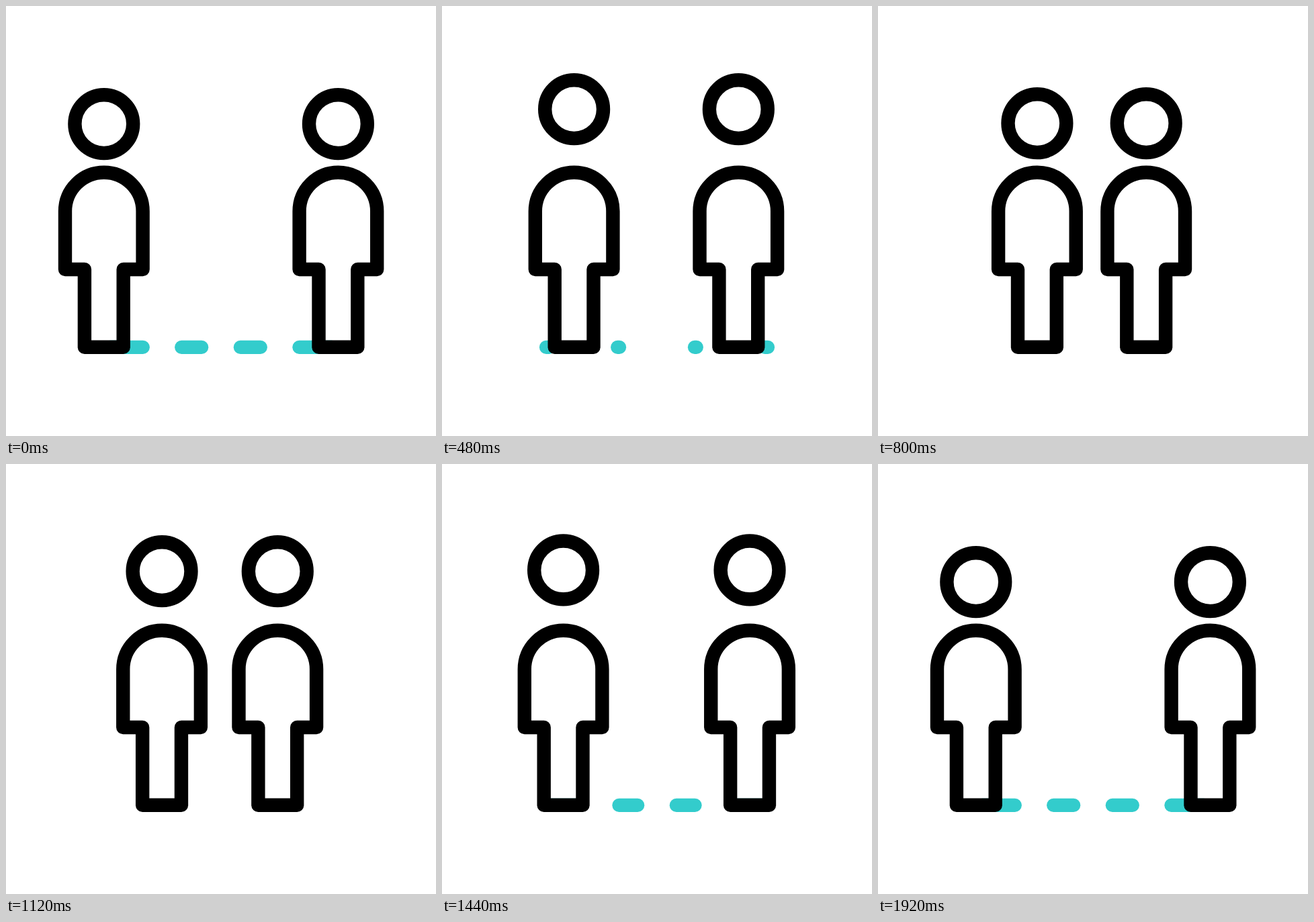
An HTML page that plays this animation: 640 by 640 pixels, repeating every 2080 ms.

```html
<!DOCTYPE html>
<html lang="en">
<head>
<meta charset="utf-8">
<title>Keeping distance</title>
<style>
  html, body { margin: 0; width: 100%; height: 100%; overflow: hidden; background: #fff; }
  svg { display: block; width: 100%; height: 100%; }
  #dashes { stroke: #33cccc; stroke-width: 20.2; }
  .person { stroke: #000; stroke-width: 20.4; }
</style>
</head>
<body>
<svg viewBox="0 0 640 640" fill="none" stroke-linecap="round" stroke-linejoin="round">
  <defs>
    <circle id="head" r="43.4"/>
    <path id="body" d="M-57.8 392V305.5A57.8 57.8 0 0 1 57.8 305.5V392H28.9V507.8H-28.9V392Z"/>
  </defs>
  <g id="dashes"><path/><path/><path/><path/></g>
  <g class="person"><use href="#head"/><use href="#body"/></g>
  <g class="person"><use href="#head"/><use href="#body"/></g>
</svg>
<script>
const LOOP = 2080, STEP = 40, LAST = 1920;
const HOP = 22, HEAD_Y = 175.6, FLOOR_Y = 507.8;

const people = [...document.querySelectorAll('.person')];
const dashes = [...document.querySelectorAll('#dashes path')];
const homes = [145.8, 494.4];
const travel = [93.5, -97.7];

// Each dash runs from its outer end to its inner end.
const spans = [[155, 203.8], [261.2, 291.2], [378.8, 348.8], [485, 436.4]];

// Symmetric ease: cubic-bezier(.5, 0, .5, 1)
function ease(x) {
  if (x <= 0) return 0;
  if (x >= 1) return 1;
  let lo = 0, hi = 1;
  for (let i = 0; i < 24; i++) {
    const p = (lo + hi) / 2;
    if (1.5 * p - 1.5 * p * p + p * p * p < x) lo = p; else hi = p;
  }
  return lo * lo * (3 - 2 * lo);
}

const ramp = (t, from, to) => ease((t - from) / (to - from));
const pulse = (t, a, b, c, d) => ramp(t, a, b) - ramp(t, c, d);
const mix = (a, b, k) => a + (b - a) * k;

function draw(t) {
  const approach = pulse(t, 0, 920, 920, 1840);
  const hop = pulse(t, 0, 430, 465, 868) + pulse(t, 870, 1273, 1308, 1711);
  people.forEach((person, i) => {
    person.setAttribute('transform', `translate(${homes[i] + travel[i] * approach} 0)`);
    person.firstElementChild.setAttribute('y', HEAD_Y - HOP * hop);
  });

  // Dashes shrink towards the outer end, then regrow from the inner end.
  const start = t < 920 ? 0 : 1 - ramp(t, 1150, 1519);
  const end = t < 920 ? 1 - ramp(t, 200, 568) : 1;
  dashes.forEach((dash, i) => {
    const [outer, inner] = spans[i];
    const path = `M${mix(outer, inner, start)} ${FLOOR_Y}H${mix(outer, inner, end)}`;
    dash.setAttribute('d', end - start > 0.001 ? path : '');
  });
}

const begin = performance.now();
function tick() {
  const t = (performance.now() - begin) % LOOP;
  draw(Math.min(Math.floor(t / STEP) * STEP, LAST));
  requestAnimationFrame(tick);
}
tick();
</script>
</body>
</html>
```
